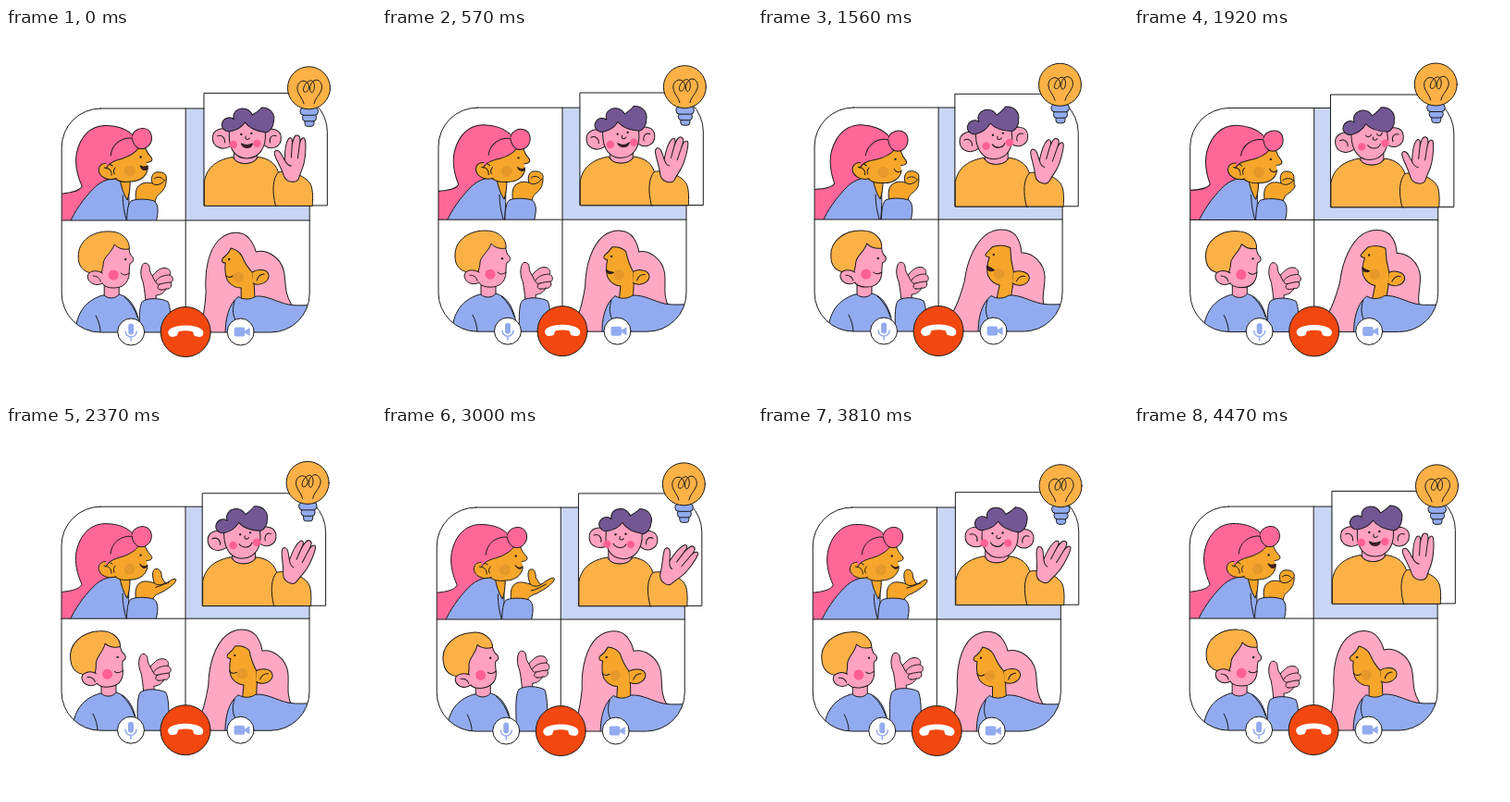
Recreate the animation shown at these times as an HTML page. Size 400x400 px, loop 4.5 s.

```html
<!DOCTYPE html>
<html lang="en">
<head>
<meta charset="utf-8">
<title>Video call</title>
<style>
html, body { margin: 0; width: 100%; height: 100%; overflow: hidden; background: #fff; }
svg { display: block; width: 100vw; height: 100vh; }
svg { fill: none; stroke: #1a1a1a; stroke-width: 1; stroke-linejoin: round; stroke-linecap: round; }
.hot { fill: #ff6798; }
.rose { fill: #ffa8c3; }
.tan { fill: #f7a62b; }
.skin { fill: #ffa1c0; }
.blue { fill: #92abf0; }
.gold { fill: #fcb146; }
.plum { fill: #735795; }
.white { fill: #fff; }
.bare { stroke: none; }
.ink { fill: #222; stroke: none; }
.mouth { fill: #4a1a22; }
.warm { fill: #e6982a; stroke: none; }
.flush { fill: #ff5f92; stroke: none; }
</style>
</head>
<body>
<svg viewBox="0 0 400 400">
  <defs>
    <clipPath id="frame"><rect x="60" y="87" width="268" height="242" rx="42"/></clipPath>
    <clipPath id="cell"><rect x="60" y="87" width="134" height="121"/></clipPath>
  </defs>

  <g id="panel">
    <rect class="white bare" x="60" y="87" width="268" height="242" rx="42"/>
    <g clip-path="url(#frame)">
      <rect x="194" y="87" width="134" height="121" fill="#c9d5f4" stroke="none"/>

      <!-- top left -->
      <g clip-path="url(#cell)">
        <g class="headA">
          <path class="hot" d="M50 225V180C68 179 79 177 82 171C77 160 74 148 76 136C80 116 92 106 106 105.500C117 105 129 108 136 115L120 165L85 225Z"/>
        </g>
        <path class="blue" d="M68 212C74 198 84 184 94 174C103 164 116 161 124 164L133 172C132 180 134 188 131 212Z"/>
        <path class="tan bare" d="M122 158L135 160C134 172 133 180 131 186C127 178 123 171 122 158Z"/>
        <path d="M123 163C124 171 127 180 131 186C133 180 134 174 134 166M126 181C126 192 128 200 130 208"/>
        <g class="headA">
          <path class="tan bare" d="M110 143C114 136 135 128 150 129C152 133 153 136 157 140C159 143 157 145 152 145L153 152C152 160 145 166 134 166C118 168 108 160 108 150Z"/>
          <path d="M150.500 130C152 134 154 137 157 140C159 143 157 145 152 145.500M153 152C152 160 145 166 134 166C128 167 122 166 118 163"/>
          <path class="tan" d="M115 149C109 144 100 146 100 154C101 161 110 166 119 162.500"/>
          <path d="M106 151C111 151 114 154 114 159M118 151C116 153 116 156 117 158"/>
          <circle class="warm" cx="133.500" cy="154.500" r="6"/>
          <circle class="ink" cx="145.500" cy="139.500" r="1.200"/>
          <path class="mouth" id="mouthA"/>
          <path class="hot bare" d="M108 152C111 145 119 143 126 141C135 138 140 134 143 130C152 133 159 124 157 116C155 107 145 107 140 111C138 112 137 113 136 115C122 113 108 128 108 152Z"/>
          <path d="M108 152C111 145 119 143 126 141C135 138 140 134 143 130C152 133 159 124 157 116C155 107 145 107 140 111C138 112 137 114 136 117M143 130C139 128 137 124 136 119M113 138C114 126 124 118 136 119"/>
        </g>
        <path class="tan" id="handA"/>
        <path id="foldA"/>
        <path class="blue" id="sleeveA" d="M130 214C131 204 130 192 135 187C142 184 154 185 160 187C166 192 164 202 161 214Z"/>
      </g>

      <!-- bottom left -->
      <g id="bodyC">
        <path class="blue" d="M74 335C75 312 82 296 104 289L122 288C135 291 144 305 146 335Z"/>
        <path class="skin" d="M106 272V289C110 293 118 293 122 288V276"/>
        <path d="M97 311C100 317 102 323 102 330M128 291C134 296 139 304 142 313"/>
      </g>
      <g id="headC">
        <path class="skin" d="M106 232L132 234C133 239 133 243 135 246C138 248 139 253 134 254.500C133 258 133 262 133 266C132 276 126 281 116 281C106 281 101 276 100 266Z"/>
        <path class="gold" d="M103 264C90 268 78 262 78 248C77 230 94 219 112 220C126 220 134 230 133 239C126 240 121 238 117 234C114 243 106 247 105 254C105 258 104 261 103 264Z"/>
        <path class="skin" d="M104 265C98 261 88 262 88 269C89 276 97 280 104 276"/>
        <path d="M94 268C98 268 101 270 102 274"/>
        <circle class="flush" cx="116" cy="267" r="5.500"/>
        <circle class="ink" cx="129" cy="250" r="1.200"/>
        <path d="M124 265C127 268 130 267 133 265"/>
      </g>
      <g id="armC">
        <path class="skin" d="M151 298C150 286 149 280 148 275C145 268 145 262 147 257C148 253 154 253 155 259C155 263 156 265 158 268C163 262 168 258 174 260C178 262 178 265 177 267C181 269 181 274 178 275C180 279 177 283 173 282C170 287 166 289 162 289V298Z"/>
        <path d="M177 267C172 267 167 268 163 272C160 275 163 278 166 277M178 275C174 275 170 276 166 277C163 279 163 283 167 283M173 282C171 283 169 283 167 283M158 268C159 270 160 272 161 274"/>
        <path class="blue" d="M145 350C144 318 143 303 147 296C153 291 168 292 175 296C178 303 179 318 177 350Z"/>
      </g>

      <!-- bottom right -->
      <g id="headD">
        <path class="rose" d="M198 350C214 322 215 300 216 285C214 262 219 240 230 229C241 219 256 219 263 228C268 234 269 238 270 242C281 239 296 247 300 262C303 275 300 285 308 298L310 320L240 350Z"/>
        <path class="tan" id="faceD"/>
        <path class="tan" d="M266 264C270 261 283 259 284 268C283 276 273 279 267 276"/>
        <path d="M279 266C275 266 272 269 271 273"/>
        <circle class="warm" cx="251" cy="269" r="5.800"/>
        <circle class="ink" cx="241" cy="250" r="1.200"/>
        <path class="mouth" id="mouthD"/>
      </g>
      <path class="blue" d="M237 335C236 314 241 298 251 290.500C257 294 264 294 270 290C282 289 292 296 305 299C316 301 324 299 334 300V335Z"/>
      <path d="M247 295C244 304 245 312 249 318"/>
    </g>
    <path d="M194 87V329M60 208H328"/>
    <rect x="60" y="87" width="268" height="242" rx="42"/>

    <circle cx="194" cy="328.500" r="27" fill="#f2470f"/>
    <path class="white bare" d="M175.500 331C173 325 183 321.500 194 321.500C205 321.500 215 325 213 331C212 335 207 334 204 333C202 332 203 329 201 328C197 327 191 327 187 328C185 329 186 332 184 333C181 334 177 335 175.500 331Z"/>
    <circle class="white" cx="135" cy="328.500" r="14.500"/>
    <rect class="blue bare" x="132" y="319.500" width="6" height="12" rx="3"/>
    <path stroke="#92abf0" stroke-width="1.500" d="M129 328A6 6 0 0 0 141 328M135 334V338"/>
    <circle class="white" cx="253.500" cy="328.500" r="14.500"/>
    <rect class="blue bare" x="246.500" y="323.500" width="11.500" height="10" rx="2"/>
    <path class="blue bare" d="M256 328.500L263.500 324V333Z"/>
  </g>

  <!-- raised card -->
  <g id="card">
    <path class="white" d="M214 70.500H305A42 42 0 0 1 347 112.500V192H214Z"/>
    <path class="skin" d="M246 128V140C248 149 268 149 271 140V128Z"/>
    <path class="gold" d="M214 192V166C217 149 230 142 245 139.500C248 149 268 149 272 139.500C284 141 293 147 295 160L293 192Z"/>
    <path class="gold" d="M291 192C287 176 288 163 294 156C305 153 327 160 330 172C332 180 331 188 331 192Z"/>
    <g id="headB">
      <path class="skin" d="M242 112C235 106 223 109 223 119C223 129 234 133 242 128"/>
      <path class="skin" d="M279 112C285 107 297 109 297 119C297 129 286 133 279 127"/>
      <path d="M228 117C233 115 237 119 236 124M292 117C287 115 284 119 285 124"/>
      <path class="skin" d="M241 100V114C240 130 247 141 260 141C273 141 281 130 280 114V100Z"/>
      <g id="faceB">
        <circle class="flush" cx="245.500" cy="126" r="4.200"/>
        <circle class="flush" cx="271" cy="125" r="4.200"/>
        <g id="eyesB"><circle class="ink" cx="254" cy="115" r="1.200"/><circle class="ink" cx="265" cy="114" r="1.200"/></g>
        <path id="lidsB" d="M251 114C252 117 256 117 257 114M263 114C264 117 268 117 269 113"/>
        <path d="M259 117C257 120 261 122 263 119"/>
        <path class="mouth" id="mouthB"/>
      </g>
      <path class="plum" d="M241 112C235 112 231 106 234 101C237 96 243 96 246 99C244 92 249 87 256 87C261 87 264 90 266 94C269 92 274 89 276 86C286 86 291 94 289 101C289 107 285 112 281 113C272 112 263 109 258 102C254 108 248 111 241 112Z"/>
    </g>
    <g id="handB">
      <path class="skin" d="M300 160C297 150 293 146 290 137C289 131 294 131 297 136L301 143C301 135 302 124 305 120C308 117 310 121 309 126C310 121 311 116 314 116C318 116 318 120 317 126C318 119 322 117 323 121C324 126 324 142 320 152C318 157 317 160 316 163C314 168 303 168 300 160Z"/>
      <path d="M309 126L308 140M317 126L315 141M301 143C303 147 305 149 308 149"/>
    </g>
  </g>

  <g id="bulb">
    <g class="blue">
      <rect x="323" y="98" width="10" height="8.500" rx="3"/>
      <rect x="320.500" y="93" width="15" height="8" rx="3.500"/>
      <rect x="318" y="86" width="19.500" height="8.500" rx="4"/>
    </g>
    <circle class="gold" cx="327.500" cy="65" r="23"/>
    <path d="M322 82C321 76 314 71 315 64C316 57 324 55 327 61C329 66 325 71 322 69C320 66 324 58 329 57C334 56 335 67 331 70C327 70 328 60 333 57C339 54 343 62 341 67C339 73 334 76 333 82"/>
  </g>
</svg>
<script>
const LOOP = 4500;
const TIMES = [0, 1170, 1920, 2370, 3000, 3810];
const COUNT = TIMES.length;

// Values at TIMES; the curve between them repeats every loop.
const TRACKS = {
  tiltA: [0, 5, 4, 0, 0, 0],
  sleeveA: [0, 3, 0.5, 0, 0, 0],
  openA: [0, 0, 0.15, 0.8, 1, 0.8],
  grinA: [1, 0, 0, 0.5, 0.3, 0.4],
  tiltB: [0, -6, -6.2, -5, 3, 1.8],
  waveB: [0, 23, 2, 20, 33, 24],
  grinB: [1, 0.3, 0, 0, 0, 0.1],
  leanC: [0, 0, 0.1, 0.75, 1, 0.75],
  armCx: [0, 6, -0.5, -2, 1.5, -1],
  armCy: [0, 0, 0, -8, -12, -10],
  tiltD: [0, 1, 0.97, 0.5, 0.2, 0.05],
  grinD: [0, 1, 0.6, 0, 0, 0]
};

const SHAPES = {
  handA: [
    "M141 190C139 180 140 174 143 171C148 166 154 167 158 168C156 162 158 157 162 156C168 155 174 157 173 163C173 166 173 168 172 170C172 171 172 172 171 173C169 177 166 179 165 180C163 182 161 184 161 190",
    "M141 190C139 180 140 175 143 171C148 166 154 168 161 170C158 162 158 156 161 154C166 153 167 158 167 163C170 167 171 170 173 170C178 167 185 161 187 164C188 168 176 176 168 180C162 182 158 184 157 190"],
  foldA: [
    "M158 168C163 172 169 168 172 164M160 163C163 160 168 161 170 164",
    "M161 170C164 173 169 173 173 170M162 177C168 176 174 172 178 170"],
  mouthA: [
    "M145 150C147 154 151 154 153 151C151 154 147 154 145 150Z",
    "M145 149C148 151 151 150 153 149C154 155 147 155 145 149Z"],
  mouthB: [
    "M252 125C255 130 263 131 266 125C263 131 255 130 252 125Z",
    "M254 125C258 127 262 127 266 125C265 131 256 131 254 125Z"],
  faceD: [
    "M243 238C241 243 238 246 234 249C232 252 234 254 237 254C236 260 237 270 240 274C244 279 249 281 254 281V296H269L268 277L266 264C262 260 258 254 255 247C252 241 247 239 243 238Z",
    "M238 242C236 245 235 247 233 250C231 253 233 254 237 254C236 260 237 270 240 274C244 279 249 281 254 281V296H269L268 277L266 264C263 258 259 248 257 239C250 237 243 239 238 242Z"],
  mouthD: [
    "M237 267C239 270 242 270 245 268C242 270 239 270 237 267Z",
    "M236 263C239 263 242 264 245 266C242 269 237 269 236 263Z"]
};

const el = id => document.getElementById(id);
const headsA = document.querySelectorAll(".headA");
const wrap = i => (i + COUNT) % COUNT;
const span = i => (TIMES[wrap(i + 1)] - TIMES[wrap(i)] + LOOP) % LOOP;

function slope(v, i) {
  const a = (v[wrap(i)] - v[wrap(i - 1)]) / span(i - 1);
  const b = (v[wrap(i + 1)] - v[wrap(i)]) / span(i);
  return a * b <= 0 ? 0 : 2 * a * b / (a + b);
}

function sample(v, t) {
  let i = COUNT - 1;
  while (TIMES[i] > t) i--;
  const h = span(i), u = (t - TIMES[i]) / h, w = 1 - u;
  return v[i] * (1 + 2 * u) * w * w + slope(v, i) * h * u * w * w
    + v[wrap(i + 1)] * u * u * (3 - 2 * u) - slope(v, i + 1) * h * u * u * w;
}

function morph(id, k) {
  const [from, to] = SHAPES[id];
  const goal = to.match(/[\d.]+/g);
  let i = 0;
  el(id).setAttribute("d", from.replace(/[\d.]+/g, n => (+n + (goal[i++] - n) * k).toFixed(2)));
}

function place(node, x, y, turn = 0, cx = 0, cy = 0) {
  node.setAttribute("transform", `translate(${x} ${y}) rotate(${turn} ${cx} ${cy})`);
}

function draw(t) {
  const p = {};
  for (const name in TRACKS) p[name] = sample(TRACKS[name], t);
  const swing = phase => Math.cos(2 * Math.PI * (t / LOOP - phase));

  place(el("panel"), 0.2 + 1.1 * swing(0.25), -1.2 * swing(0.25));
  place(el("card"), 0.9 * swing(0.05) - 0.5, 1 + 1.5 * swing(0.62));
  place(el("bulb"), -0.7 - 0.7 * swing(0.53), -2 - 2 * swing(0.43));

  headsA.forEach(head => place(head, 0, 0, p.tiltA, 105, 165));
  place(el("sleeveA"), p.sleeveA, 0);
  morph("handA", p.openA);
  morph("foldA", p.openA);
  morph("mouthA", p.grinA);

  place(el("headB"), 0, 0, p.tiltB, 257, 160);
  place(el("faceB"), -0.9 * p.tiltB, 0);
  place(el("handB"), 0, 0, p.waveB, 306, 162);
  morph("mouthB", p.grinB);
  const blink = Math.abs(t - 1920) < 90;
  el("eyesB").style.display = blink ? "none" : "";
  el("lidsB").style.display = blink ? "" : "none";

  place(el("bodyC"), -4 * p.leanC, 0);
  place(el("headC"), -6 * p.leanC, 2 * p.leanC, -8 * p.leanC, 110, 285);
  place(el("armC"), p.armCx, p.armCy);

  place(el("headD"), 4 * p.tiltD, 0, 12 * p.tiltD, 265, 290);
  morph("faceD", p.tiltD);
  morph("mouthD", p.grinD);
}

const start = performance.now();
function tick() {
  draw((performance.now() - start) % LOOP);
  requestAnimationFrame(tick);
}
tick();
</script>
</body>
</html>
```
